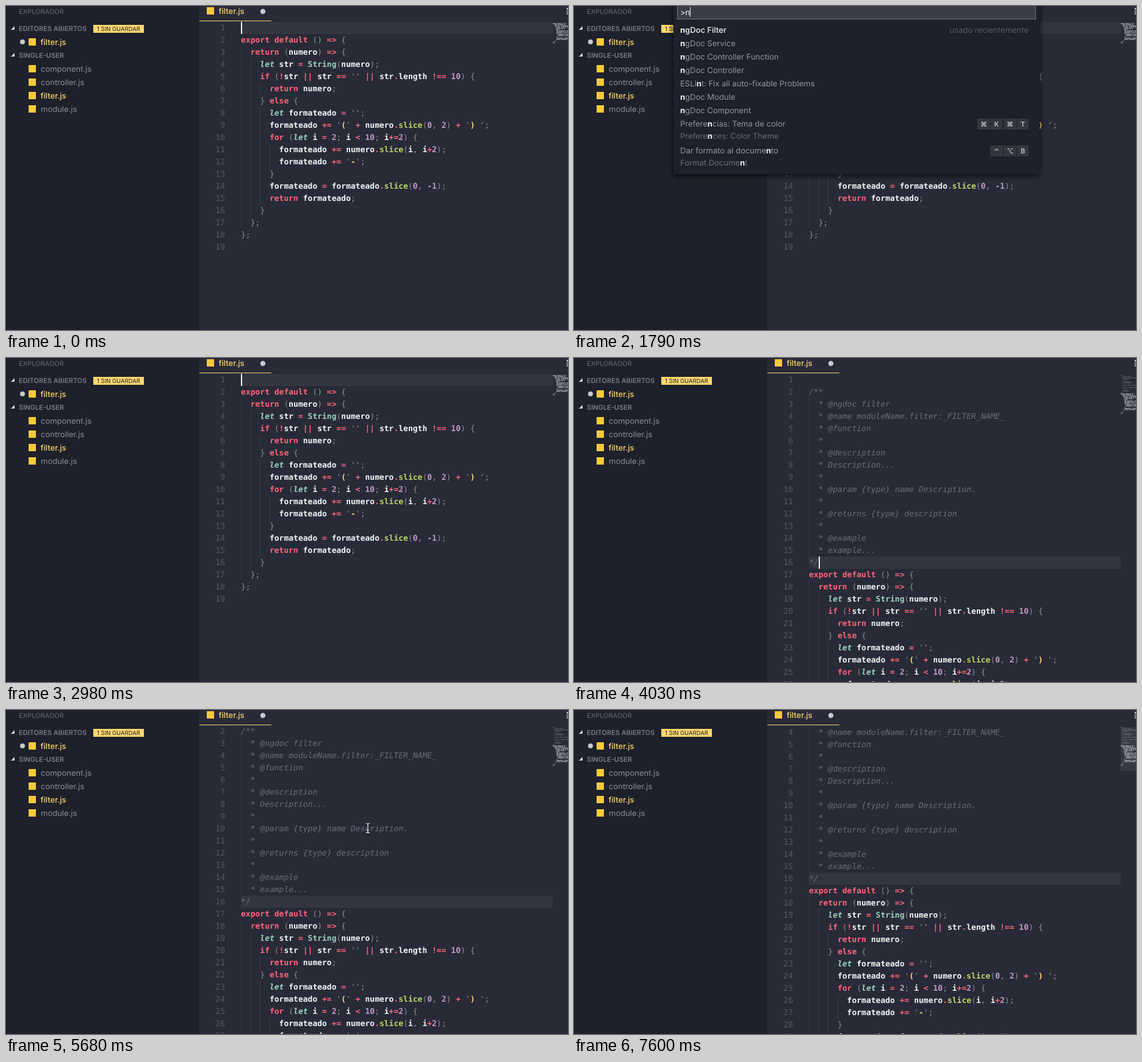
These frames come from a looping animation (921 px wide and 532 px high, 7850 ms). An HTML page with a canvas:

```html
<!DOCTYPE html>
<html lang="es">
<head>
<meta charset="utf-8">
<title>filter.js</title>
<style>
  html, body { margin: 0; width: 100%; height: 100%; overflow: hidden; background: #282a38; }
  canvas { display: block; }
</style>
</head>
<body>
<canvas id="stage" width="921" height="532"></canvas>
<script>
const ctx = document.getElementById('stage').getContext('2d');
const LOOP = 7850, COL = 7.826, ROW = 20, LEFT = 385, TOP = 26;
const UI = 'Inter, sans-serif', MONO = '"DejaVu Sans Mono", monospace';
const C = {
  editor: '#282a38', side: '#1e202b', white: '#f2f6f6', grey: '#888d94', dim: '#696d77',
  faint: '#535763', yellow: '#ffd76d', red: '#ff657a', green: '#9cd1bb', lime: '#bad761', purple: '#c39ac9'
};

const code = `export default () => {
  return (numero) => {
    let str = String(numero);
    if (!str || str == '' || str.length !== 10) {
      return numero;
    } else {
      let formateado = '';
      formateado += '(' + numero.slice(0, 2) + ') ';
      for (let i = 2; i < 10; i+=2) {
        formateado += numero.slice(i, i+2);
        formateado += '-';
      }
      formateado = formateado.slice(0, -1);
      return formateado;
    }
  };
};
`.split('\n');

const snippet = `/**
  * @ngdoc filter
  * @name moduleName.filter:_FILTER_NAME_
  * @function
  *
  * @description
  * Description...
  *
  * @param {type} name Description.
  *
  * @returns {type} description
  *
  * @example
  * example...
*/`.split('\n');

const commands = [
  { label: 'ngDoc Filter', note: 'usado recientemente' },
  { label: 'ngDoc Service' },
  { label: 'ngDoc Controller Function' },
  { label: 'ngDoc Controller' },
  { label: 'ESLint: Fix all auto-fixable Problems' },
  { label: 'ngDoc Module' },
  { label: 'ngDoc Component' },
  { label: 'Preferencias: Tema de color', alias: 'Preferences: Color Theme', keys: '⌘K ⌘T' },
  { label: 'Dar formato al documento', alias: 'Format Document', keys: '⌃⌥B' }
];

// Each rule: pattern, colour, font style
const rules = [
  [/^'[^']*'/, C.yellow, 'bold'],
  [/^let\b/, C.green, 'italic bold'],
  [/^(export|default|return|if|else|for)\b/, C.red, 'bold'],
  [/^String\b/, C.green, 'bold'],
  [/^slice\b/, C.lime, 'bold'],
  [/^-?\d+/, C.purple, 'bold'],
  [/^\w+/, C.white, 'bold'],
  [/^[=!+<>|.]+/, C.red, 'bold'],
  [/^[(){};,]/, C.grey, ''],
  [/^\s+/, null, '']
];

function tokenize(line) {
  const tokens = [];
  let col = 0;
  const add = (text, color, style) => {
    if (color) tokens.push({ text, color, style, col });
    col += text.length;
  };
  while (col < line.length) {
    const rest = line.slice(col);
    const [pattern, color, style] = rules.find(r => r[0].test(rest));
    const text = rest.match(pattern)[0];
    if (text[0] === "'") {
      add("'", C.grey, '');
      add(text.slice(1, -1), color, style);
      add("'", C.grey, '');
    } else add(text, color, style);
  }
  return tokens;
}

const comment = line => {
  const col = line.search(/\S/);
  return [{ text: line.slice(col), color: C.dim, style: 'italic', col }];
};
const makeRow = (line, parse) => ({ tokens: parse(line), indent: Math.max(0, line.search(/\S/)) });
const blank = makeRow('', tokenize);
const codeRows = code.map(line => makeRow(line, tokenize));
const plainDoc = [blank, ...codeRows];
const commentedDoc = [blank, ...snippet.map(line => makeRow(line, comment)), ...codeRows];

function rect(x, y, w, h, color) {
  ctx.fillStyle = color;
  ctx.fillRect(x, y, w, h);
}
function dot(x, y, r, color) {
  ctx.fillStyle = color;
  ctx.beginPath();
  ctx.arc(x, y, r, 0, Math.PI * 2);
  ctx.fill();
}
function write(text, x, y, color, font, align = 'left') {
  ctx.font = font;
  ctx.fillStyle = color;
  ctx.textAlign = align;
  ctx.fillText(text, x, y);
  return ctx.measureText(text).width;
}
const within = (t, spans) => spans.some(([from, to]) => t >= from && t < to);

// Linear interpolation through [time, ...values]
function track(keys, t) {
  let i = 0;
  while (i < keys.length - 2 && t >= keys[i + 1][0]) i++;
  const [a, b] = [keys[i], keys[i + 1]];
  const k = Math.min(1, Math.max(0, (t - a[0]) / (b[0] - a[0])));
  return a.slice(1).map((v, n) => v + (b[n + 1] - v) * k);
}

function drawSidebar() {
  rect(0, 0, 316, 532, C.side);
  rect(0, 0, 1, 532, '#171922');
  write('EXPLORADOR', 21, 13, '#656973', `11px ${UI}`);
  [['EDITORES ABIERTOS', 37], ['SINGLE-USER', 81]].forEach(([title, y]) => {
    ctx.fillStyle = '#d5d8dc';
    ctx.beginPath();
    ctx.moveTo(14, y - 4);
    ctx.lineTo(14, y + 2);
    ctx.lineTo(8, y + 2);
    ctx.fill();
    write(title, 21, y + 4, '#777b84', `600 11px ${UI}`);
  });
  rect(143, 31, 83, 13, C.yellow);
  write('1 SIN GUARDAR', 149, 41, C.side, `9.5px ${UI}`);
  dot(27, 59, 4, '#c8cacd');
  const files = [['filter.js', 59], ['component.js', 103], ['controller.js', 125], ['filter.js', 147], ['module.js', 169]];
  for (const [name, y] of files) {
    const active = name === 'filter.js';
    rect(37, y - 6, 12, 12, '#fbc93d');
    write(name, active ? 56.5 : 57, y + 5, active ? C.yellow : C.grey, `${active ? 500 : 400} 13px ${UI}`);
  }
}

function drawMinimap(doc, slider) {
  if (slider) rect(896, 28, 25, 72, 'rgba(234,242,241,.07)');
  doc.forEach(({ tokens }, i) => tokens.forEach(({ text, col, style }) => {
    ctx.fillStyle = style === 'italic' ? 'rgba(150,155,165,.36)' : 'rgba(234,236,240,.58)';
    [...text].forEach((ch, n) => {
      if (ch !== ' ') ctx.fillRect(896 + col + n, TOP + i * 2, 1, 1.4);
    });
  }));
}

function drawEditor(doc, activeRow, caretCol, caretOn, scroll, slider) {
  rect(316, 0, 605, 532, C.editor);
  ctx.save();
  ctx.beginPath();
  ctx.rect(316, TOP, 605, 506);
  ctx.clip();
  doc.forEach(({ tokens, indent }, i) => {
    const y = TOP + i * ROW - scroll;
    if (y < 0 || y > 532) return;
    if (i === activeRow) rect(LEFT, y, 511, ROW, '#333641');
    for (let c = 0; c < indent; c += 2) rect(Math.round(LEFT + c * COL), y, 1, ROW, '#373a47');
    write(i + 1, 359, y + 14, C.faint, `13px ${MONO}`, 'right');
    for (const { text, color, style, col } of tokens)
      write(text, LEFT + col * COL, y + 14, color, `${style} 13px ${MONO}`);
    if (i === activeRow && caretOn) rect(Math.round(LEFT + caretCol * COL), y, 2, ROW, C.white);
  });
  drawMinimap(doc, slider);
  ctx.restore();

  rect(329, 2, 12, 12, '#fbc93d');
  write('filter.js', 348.5, 13, C.yellow, `500 13px ${UI}`);
  dot(421, 9, 4.2, '#c8cacd');
  rect(317, 24, 118, 1, C.yellow);
  rect(919, 3, 2, 11, '#c8cacd');
  rect(920, 5, 1, 8, C.editor);
}

function drawLabel(text, query, x, y, color, weight) {
  const at = query ? text.indexOf(query) : -1;
  const parts = at < 0 ? [text] : [text.slice(0, at), query, text.slice(at + query.length)];
  parts.forEach((part, i) => {
    const hit = i === 1;
    x += write(part, x, y, hit ? C.white : color, `${hit ? 700 : weight} 13px ${UI}`);
  });
}

function drawKeys(keys, y) {
  let x = 745;
  for (const key of [...keys].reverse()) {
    if (key === ' ') { x -= 1; continue; }
    const w = key < '~' ? 19 : 21;
    x -= w;
    rect(x, y - 9, w, 18, '#33353f');
    write(key, x + w / 2, y + 4, '#d5d8dc', `500 11px Inter, "DejaVu Sans", sans-serif`, 'center');
    x -= 1;
  }
}

function drawPalette(query, listed, caretOn) {
  const items = listed ? commands.filter(c => c.label.includes(query)) : [];
  const height = items.reduce((sum, c) => sum + (c.alias ? 44 : 22), listed ? 34 : 28);
  ctx.save();
  ctx.shadowColor = 'rgba(0,0,0,.75)';
  ctx.shadowBlur = 9;
  ctx.shadowOffsetY = 3;
  rect(163, -20, 600, height + 20, C.side);
  ctx.restore();

  rect(169, 0, 588, 22, '#70747d');
  rect(170, 0, 586, 21, '#3a3d48');
  const width = write('>' + query, 174, 15, C.white, `13px ${UI}`);
  if (caretOn) rect(Math.round(174 + width), 2, 1, 16, C.white);

  let y = 28;
  items.forEach(({ label, alias, note, keys }, i) => {
    drawLabel(label, query, 174, y + 16, i ? '#9296a0' : C.white, i ? 400 : 500);
    if (alias) drawLabel(alias, query, 174, y + 36, '#666a74', 400);
    if (note) write(note, 745, y + 16, '#555963', `13px ${UI}`, 'right');
    if (keys) drawKeys(keys, y + 12);
    y += alias ? 44 : 22;
  });
}

function drawPointer(x, y) {
  ctx.beginPath();
  ctx.moveTo(x - 3, y - 8);
  ctx.quadraticCurveTo(x, y - 8, x, y - 5);
  ctx.quadraticCurveTo(x, y - 8, x + 3, y - 8);
  ctx.moveTo(x, y - 6);
  ctx.lineTo(x, y + 6);
  ctx.moveTo(x - 3, y + 8);
  ctx.quadraticCurveTo(x, y + 8, x, y + 5);
  ctx.quadraticCurveTo(x, y + 8, x + 3, y + 8);
  ctx.moveTo(x - 2, y + 3);
  ctx.lineTo(x + 2, y + 3);
  for (const [width, color] of [[3, 'rgba(0,0,0,.7)'], [1.2, '#fff']]) {
    ctx.lineWidth = width;
    ctx.strokeStyle = color;
    ctx.stroke();
  }
}

const caretSpans = [[0, 150], [2980, 3580], [4030, 4630], [5080, 5530], [6130, 6580], [7000, 7600]];
const typingTimes = [1790, 1930, 2080, 2230, 2380];
const scrollKeys = [[5530, 0], [5680, 21], [5980, 59]];
const pointerKeys = [[4180, 505, 504], [4630, 553, 267], [4930, 560, 250], [5530, 593, 194], [6130, 593, 194], [7000, 890, 519]];

function draw(t) {
  const inserted = t >= 3130;
  const step = 4030 + Math.floor((t - 4030) / 150) * 150;
  const [scroll] = track(scrollKeys, step);
  drawEditor(inserted ? commentedDoc : plainDoc, inserted ? 15 : 0, inserted ? 2 : 0,
    within(t, caretSpans), scroll, t >= 7000);
  drawSidebar();
  if (within(t, [[590, 2980]])) {
    const typed = typingTimes.filter(time => t >= time).length;
    drawPalette('ngDoc'.slice(0, typed), t >= 740, !within(t, [[1190, 1790]]));
  }
  if (within(t, [[4180, 7300]])) drawPointer(...track(pointerKeys, step).map(Math.round));
}

ctx.textRendering = 'geometricPrecision';
function frame() {
  draw(performance.now() % LOOP);
  requestAnimationFrame(frame);
}
frame();
</script>
</body>
</html>
```
